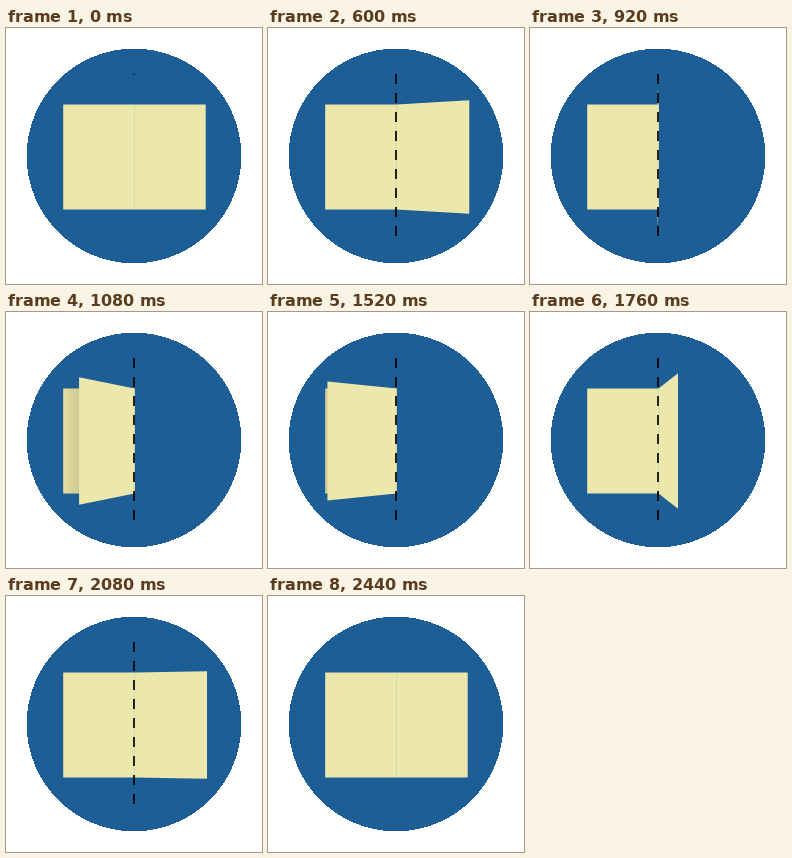
These frames come from a looping animation (256x256 px, 3040 ms). An HTML page:

```html
<!DOCTYPE html>
<html lang="en">
<head>
<meta charset="utf-8">
<title>Folding paper</title>
<style>
html, body { margin: 0; width: 100%; height: 100%; overflow: hidden; background: #fff; }
svg { display: block; width: 100vw; height: 100vh; }
</style>
</head>
<body>
<svg viewBox="0 0 256 256">
  <defs>
    <linearGradient id="shade" gradientUnits="userSpaceOnUse" y1="0" y2="0">
      <stop offset="0" stop-color="#5a5020" stop-opacity="0"/>
      <stop offset="1" stop-color="#5a5020" stop-opacity=".19"/>
    </linearGradient>
  </defs>
  <circle cx="128" cy="128" r="107.35" fill="#1c5e95" shape-rendering="crispEdges"/>
  <rect x="57.2" y="76.5" width="71.6" height="105" fill="#ece7ab"/>
  <rect id="shadow" x="57.2" y="76.5" width="71.6" height="105" fill="url(#shade)"/>
  <polygon id="flap" fill="#ece7ab"/>
  <path id="crease" stroke="#000" stroke-width="1.7" fill="none"/>
</svg>
<script>
const LOOP = 3040, STEP = 40;
const HINGE = 128.5, MID = 129, HALF_W = 71.2, HALF_H = 52.5, DEPTH = 310;
const LINE_TOP = 46, LINE_LEN = 162, DASH = 10, PERIOD = 19;

const el = id => document.getElementById(id);
const shade = el('shade'), shadow = el('shadow'), flap = el('flap'), crease = el('crease');

const span = (t, a, b) => Math.min(1, Math.max(0, (t - a) / (b - a)));

// Symmetric ease-in-out, cubic-bezier(.42, 0, .58, 1)
function ease(x) {
  let lo = 0, hi = 1;
  for (let i = 0; i < 24; i++) {
    const s = (lo + hi) / 2, r = 1 - s;
    if (1.26 * r * r * s + 1.74 * r * s * s + s * s * s < x) lo = s; else hi = s;
  }
  return lo * lo * (3 - 2 * lo);
}

// The fold eases through upright; the unfolding is one sweep.
function angleAt(t) {
  const fold = 90 * (ease(span(t, 474, 871)) + ease(span(t, 897, 1289)));
  const open = 180 * (1 - ease(span(t, 1243, 2201)));
  return Math.min(fold, open) * Math.PI / 180;
}

function drawFlap(t) {
  const a = angleAt(t);
  const scale = DEPTH / (DEPTH - HALF_W * Math.sin(a));
  const x = HINGE + HALF_W * Math.cos(a) * scale;
  const h = HALF_H * scale;
  flap.setAttribute('points',
    `${HINGE},${MID - HALF_H} ${x},${MID - h} ${x},${MID + h} ${HINGE},${MID + HALF_H}`);
  shade.setAttribute('x1', x - 24);
  shade.setAttribute('x2', x);
  shadow.setAttribute('opacity', Math.min(1, Math.max(0, -Math.cos(a) * 1.6)));
}

function drawCrease(t) {
  const grow = t < 2130 ? span(t, -1.5, 280) : 1 - span(t, 2130, 2440);
  const end = LINE_LEN * grow;
  let d = '';
  for (let y = 0; y < end; y += PERIOD)
    d += `M128 ${LINE_TOP + y}V${LINE_TOP + Math.min(y + DASH, end)}`;
  crease.setAttribute('d', d);
}

function render(now) {
  const t = Math.floor((now % LOOP) / STEP) * STEP;
  drawFlap(t);
  drawCrease(t);
}

let start;
function tick(now) {
  if (start === undefined) start = now;
  render(Math.max(0, now - start));
  requestAnimationFrame(tick);
}
render(0);
requestAnimationFrame(tick);
</script>
</body>
</html>
```
